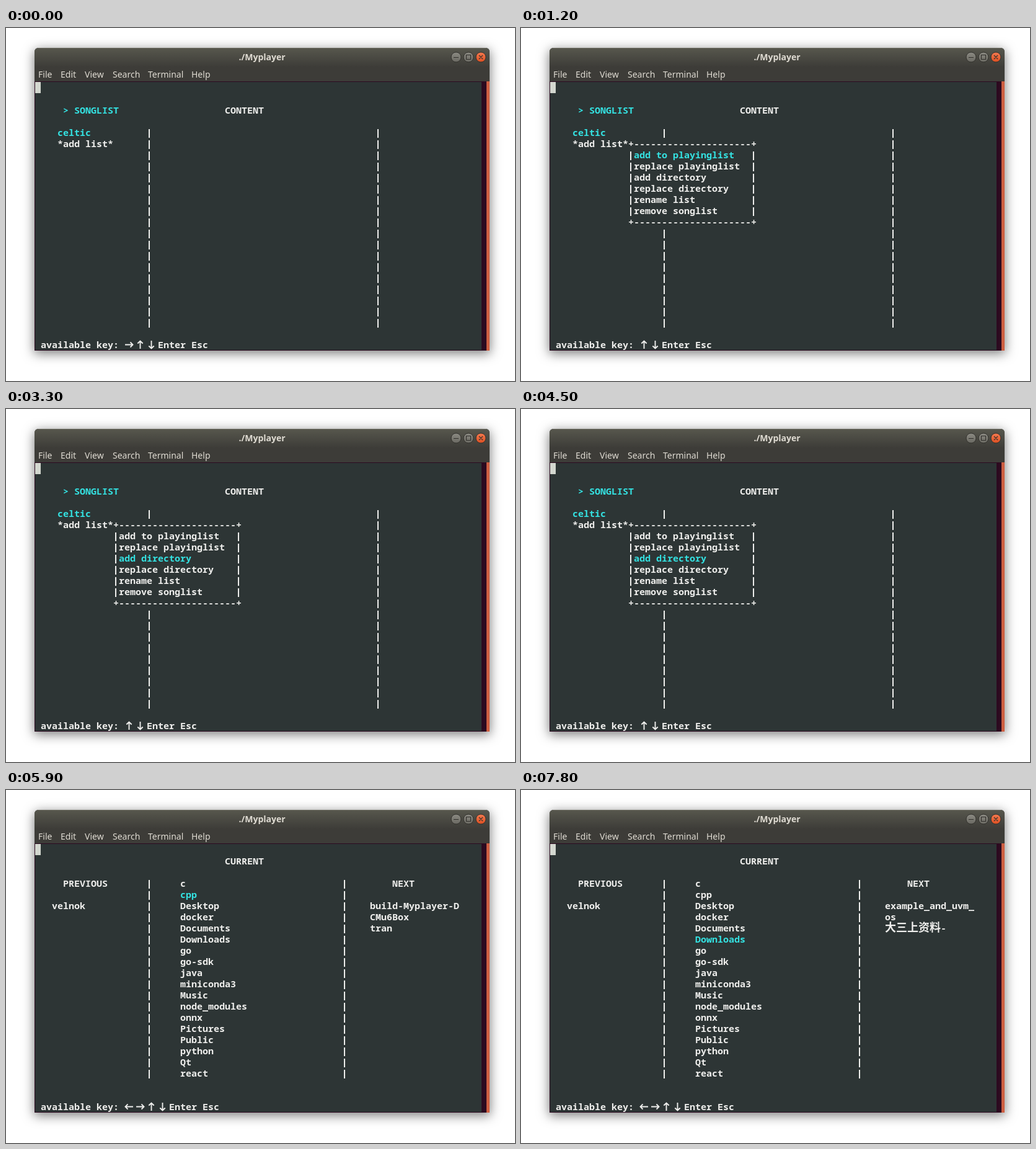
These frames come from a looping animation (821 px wide and 569 px high, 8 s). An HTML page:

```html
<!DOCTYPE html>
<html lang="en">
<head>
<meta charset="utf-8">
<title>Terminal player</title>
<style>
html, body { margin: 0; width: 100%; height: 100%; overflow: hidden; background: #fff; }
#shade {
  position: absolute; left: 46px; top: 32px; width: 734px; height: 488px;
  border-radius: 7px 7px 0 0; box-shadow: 0 4px 18px 1px rgba(0, 0, 0, .5);
}
svg { position: absolute; left: 0; top: 0; display: block; }
.ui { font: 14px "Noto Sans", "Open Sans", sans-serif; fill: #dfdbd2; }
.title { font-weight: 700; text-anchor: middle; }
#screen { font: 700 15px "Noto Sans Mono", "DejaVu Sans Mono", monospace; fill: #eeeeec; }
#screen .on { fill: #34e2e2; }
#screen .cjk { font: 700 18px "Noto Sans CJK SC", "Noto Sans CJK", sans-serif; }
#screen .arrow { fill: none; stroke: #eeeeec; stroke-width: 1.9; }
</style>
</head>
<body>
<div id="shade"></div>
<svg width="821" height="569" viewBox="0 0 821 569">
  <defs>
    <linearGradient id="bar" x1="0" y1="0" x2="0" y2="1">
      <stop offset="0" stop-color="#57574d"/>
      <stop offset="1" stop-color="#3d3c38"/>
    </linearGradient>
    <linearGradient id="grey" x1="0" y1="0" x2="0" y2="1">
      <stop offset="0" stop-color="#8b8a82"/>
      <stop offset="1" stop-color="#6a6962"/>
    </linearGradient>
    <linearGradient id="red" x1="0" y1="0" x2="0" y2="1">
      <stop offset="0" stop-color="#f37a50"/>
      <stop offset="1" stop-color="#dd5022"/>
    </linearGradient>
  </defs>
  <path d="M46 87V39q0-7 7-7H773q7 0 7 7V87Z" fill="#3d3c38"/>
  <path d="M46 63V39q0-7 7-7H773q7 0 7 7V63Z" fill="url(#bar)"/>
  <path d="M52 32.5H774" stroke="#6a695f"/>
  <text class="ui title" x="413" y="52">./Myplayer</text>
  <g stroke="#32312d">
    <circle cx="726" cy="47" r="8" fill="url(#grey)"/>
    <circle cx="746" cy="47" r="8" fill="url(#grey)"/>
    <circle cx="766" cy="47" r="8" fill="url(#red)"/>
    <path d="M722 47.5H730M742.5 43.5H749.5V50.5H742.5ZM763 44L769 50M769 44L763 50" fill="none" stroke-width="1.2"/>
  </g>
  <g class="ui">
    <text x="52" y="80">File</text>
    <text x="88" y="80">Edit</text>
    <text x="127" y="80">View</text>
    <text x="172" y="80">Search</text>
    <text x="229" y="80">Terminal</text>
    <text x="299" y="80">Help</text>
  </g>
  <path d="M46 86H780V520H46Z" fill="#2c0a20"/>
  <path d="M47 87H767V519H47Z" fill="#2d3535"/>
  <path d="M775 86H780V520H775Z" fill="#ce5f42"/>
  <g id="screen"></g>
  <rect id="cursor" x="47" y="87" width="9" height="18" fill="#d3d7cf"/>
</svg>
<script>
const LOOP = 8000;
const screenEl = document.getElementById('screen');
const cursor = document.getElementById('cursor');

const actions = ['add to playinglist', 'replace playinglist', 'add directory',
  'replace directory', 'rename list', 'remove songlist'];
const folders = ['c', 'cpp', 'Desktop', 'docker', 'Documents', 'Downloads', 'go',
  'go-sdk', 'java', 'miniconda3', 'Music', 'node_modules', 'onnx', 'Pictures',
  'Public', 'python', 'Qt', 'react'];
const children = {
  c: ['os-scut', 'tmp'],
  cpp: ['build-Myplayer-D', 'CMu6Box', 'tran'],
  docker: ['pd-mod', 'tidb-docker-comp'],
  Downloads: ['example_and_uvm_', 'os', '大三上资料-']
};

// [start, view, selected item]
const steps = [[0, 'songs', 0], [1200, 'menu', 0], [2700, 'menu', 1], [3300, 'menu', 2],
  [4800, 'files', 0], [5900, 'files', 1], [6400, 'files', 2], [6900, 'files', 3],
  [7400, 'files', 4], [7800, 'files', 5]];
// spans in which the cursor is hidden
const hidden = [[300, 900], [1700, 2300], [3900, 4500], [5300, 5900]];

const colX = c => 47 + 9 * c;
const rowY = r => 87 + 18 * r;

function text(col, row, str, on) {
  const cls = on ? ' class="on"' : '';
  return `<text x="${colX(col)}" y="${rowY(row) + 15}"${cls}>${str}</text>`;
}

function bars(col, from, to) {
  let out = '';
  for (let r = from; r <= to; r++)
    out += `<rect x="${colX(col) + 3}" y="${rowY(r) + 4}" width="2" height="14"/>`;
  return out;
}

function list(col, row, items, sel) {
  return items.map((s, i) => text(col, row + i, s, i === sel)).join('');
}

function keys(angles) {
  let col = 16, out = text(1, 23, 'available key:');
  for (const a of angles) {
    out += `<path class="arrow" d="M-6.5 0H6M2 -4.2L6 0L2 4.2" transform="translate(${colX(col) + 7.5} 510.5) rotate(${a})"/>`;
    col += 2;
  }
  return out + text(col, 23, 'Enter Esc');
}

function songs(menuSel) {
  const open = menuSel >= 0;
  let out = text(5, 2, '&gt; SONGLIST', true) + text(34, 2, 'CONTENT') +
    text(4, 4, 'celtic', true) + text(4, 5, '*add list*') + bars(61, 4, 21);
  if (!open) return out + bars(20, 4, 21) + keys([0, -90, 90]);
  const edge = '+' + '-'.repeat(21) + '+';
  return out + bars(20, 4, 4) + bars(20, 13, 21) +
    text(14, 5, edge) + text(14, 12, edge) + bars(14, 6, 11) + bars(36, 6, 11) +
    list(15, 6, actions, menuSel) + keys([-90, 90]);
}

function files(sel) {
  const next = children[folders[sel]] || [];
  return text(34, 1, 'CURRENT') + text(5, 3, 'PREVIOUS') + text(64, 3, 'NEXT') +
    text(3, 5, 'velnok') + bars(20, 3, 20) + bars(55, 3, 20) +
    list(26, 3, folders, sel) +
    list(60, 5, next).replace(/<text([^>]*)>([\u4e00-\u9fff]+)/, '<text$1><tspan class="cjk">$2</tspan>') +
    keys([180, 0, -90, 90]);
}

let shown = null;
function draw(t) {
  const step = steps.filter(s => s[0] <= t).pop();
  if (step !== shown) {
    shown = step;
    const [, view, sel] = step;
    screenEl.innerHTML = view === 'files' ? files(sel) : songs(view === 'menu' ? sel : -1);
  }
  const off = hidden.some(([a, b]) => t >= a && t < b);
  cursor.setAttribute('visibility', off ? 'hidden' : 'visible');
}

const begin = performance.now();
function tick() {
  draw((performance.now() - begin) % LOOP);
  requestAnimationFrame(tick);
}
tick();
</script>
</body>
</html>
```
